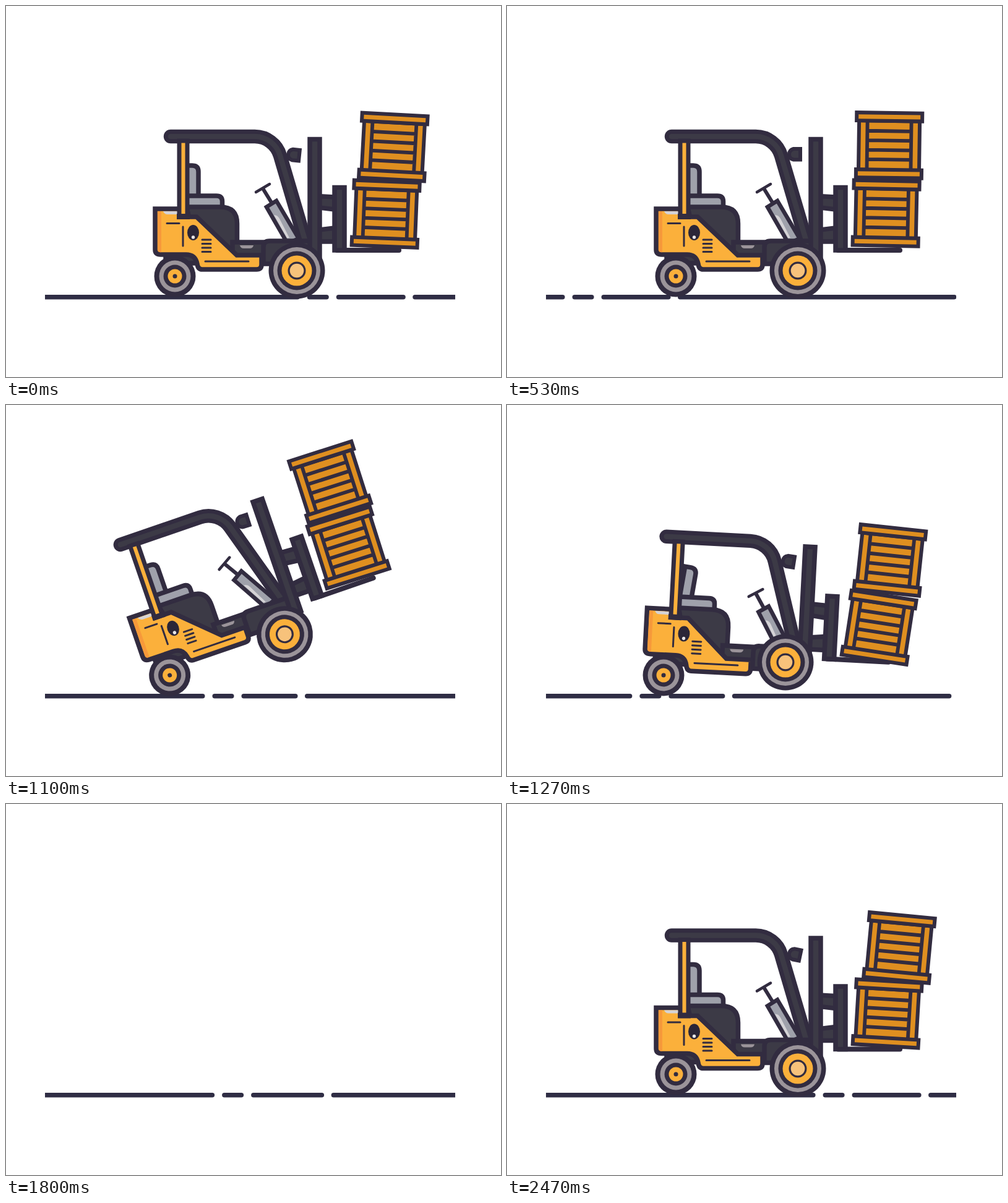
Animation, 800 px wide and 600 px high, one loop 2510 ms. Source, as an HTML page:

```html
<!DOCTYPE html>
<html lang="en">
<head>
<meta charset="utf-8">
<title>Forklift</title>
<style>
  html, body { margin: 0; width: 100%; height: 100%; overflow: hidden; background: #fff; }
  svg { display: block; width: 100%; height: 100%; }
  .ink { stroke: #322c40; stroke-width: 7.5; }
  .coal { fill: #3c3a46; }
  .gold { fill: #fbb03b; }
  .steel { fill: #9fa1ab; }
  .wood { fill: #df8f20; stroke: #322c40; stroke-width: 6; }
  .line { fill: none; stroke: #322c40; stroke-width: 3; stroke-linecap: round; }
  .trail { fill: none; stroke: #3c3a46; stroke-width: 5; }
</style>
</head>
<body>
<svg viewBox="0 0 800 600">
  <defs>
    <clipPath id="strip"><rect x="63" y="460" width="663" height="20"/></clipPath>
    <g id="crate">
      <rect class="wood" x="7" y="-95" width="98" height="80"/>
      <path d="M20.5-95V-16M91.5-95V-16M20-78.6H92M20-63.2H92M20-47.8H92M20-32.4H92" stroke="#322c40" stroke-width="5.8"/>
      <rect class="wood" x="3" y="-108" width="106" height="13"/>
      <rect class="wood" x="3" y="-16" width="106" height="13"/>
    </g>
  </defs>

  <g clip-path="url(#strip)">
    <path id="ground" fill="none" stroke="#2f2d44" stroke-width="7.5" stroke-linecap="round"/>
  </g>

  <g id="trails">
    <path class="trail" data-tail="170" d="M-60 20C20 28 80 46 132 77Q206 122 255 192"/>
    <path class="trail" data-tail="33" d="M-20 20Q90 78 175 161"/>
    <path class="trail" data-tail="110" d="M60 60Q150 102 221 181Q256 224 280 272"/>
  </g>

  <g id="truck">
    <g id="body">
      <g id="lift">
        <path class="ink coal" d="M505 307.500L531 309V329L505 326ZM505 362L531 359V381H505Z"/>
        <path d="M535 395H635" stroke="#322c40" stroke-width="8" stroke-linecap="round"/>
        <rect class="ink coal" x="531" y="293.500" width="16" height="101.500"/>
        <g id="low">
          <use href="#crate"/>
          <g id="high"><use href="#crate"/></g>
        </g>
      </g>
      <path class="ink coal" d="M258 400H310V416H258Z"/>
      <path id="seat" class="ink steel" d="M292 258H301Q311 258 311 268V312H292Z"/>
      <path class="ink steel" d="M292 307H340Q349.500 307 349.500 316V328H292Z"/>
      <path class="ink coal" d="M292 325H346Q373.500 325 373.500 352V410H310Z"/>
      <rect class="ink coal" x="366" y="382" width="60" height="22"/>
      <path d="M378 387H400Q399 392 394 392H384Q379 392 378 387Z" fill="#9b949a"/>
      <path class="ink" fill="none" d="M431 321L415 295" style="stroke-width:6"/>
      <path class="line" d="M404 301L426 288" style="stroke-width:4.500"/>
      <path class="ink steel" d="M421 325L437 315L473 376L455 384Z" style="stroke-width:6.500"/>
      <path d="M433 338Q439 338 442 344L458 375H454Z" fill="#d5d3d6"/>
      <g id="lamp"><path class="ink coal" d="M474 231H463Q456 233 456 240Q456 247 463 248.500H474Z" style="stroke-width:6"/></g>
      <path d="M266 211H402A42.800 42.800 0 0 1 443 242L483 378" fill="none" stroke="#322c40" stroke-width="22.500" stroke-linecap="round"/>
      <path d="M266 211H402A42.800 42.800 0 0 1 443 242L483 378" fill="none" stroke="#3c3a46" stroke-width="8.500" stroke-linecap="round"/>
      <path class="ink coal" d="M416 417V390Q416 380 426 380H492V417Z"/>
      <rect class="ink coal" x="491" y="215.500" width="16" height="192"/>
      <path class="ink gold" d="M241 328H280V341H308L373 403H413V418Q413 426 405 426H317Q310 426 309 417Q306 402 291 402H250Q241 402 241 394Z"/>
      <path d="M245 332H251V398Q245 399 245 393Z" fill="#f7993a"/>
      <path d="M254 332H277V337H261Q256 337 254 332Z" fill="#d5d3d6"/>
      <rect class="ink gold" x="280" y="218" width="13" height="123" style="stroke-width:7"/>
      <path d="M276 336H297V345H276Z" fill="#322c40"/>
      <path class="line" d="M260 351.500H280M286 357V388M317 378H331M317 384.500H331M317 391H331M317 397.500H331M322 413H392"/>
      <ellipse cx="302.500" cy="366.500" rx="9.500" ry="12.500" fill="#2b2638"/>
      <circle cx="302.500" cy="374" r="2.700" fill="#e8e6e8"/>
    </g>
    <g id="rear">
      <circle r="33.500" fill="#322c40"/><circle r="25.500" fill="#9b949a"/>
      <circle r="18.500" fill="#322c40"/><circle r="11.500" fill="#fbb03b"/><circle r="3.500" fill="#322c40"/>
    </g>
    <g id="front">
      <circle r="45.500" fill="#322c40"/><circle r="38" fill="#9b949a"/>
      <circle r="31.500" fill="#322c40"/><circle r="24.500" fill="#fbb03b"/>
      <circle r="14.500" fill="#322c40"/><circle r="11.300" fill="#f7c27b"/>
    </g>
  </g>
  <path id="dust" class="line" style="stroke-width:8"/>
</svg>

<script>
  const LOOP = 2510, FRAMES = 75, STEP = 1000 / 30, SPAN = 1787;
  const $ = id => document.getElementById(id);
  const move = (id, x, y, turn = 0, cx = 0, cy = 0) =>
    $(id).setAttribute('transform', `translate(${x} ${y}) rotate(${turn} ${cx} ${cy})`);

  // Eased value between [frame, value] stops
  function ease(f, stops) {
    const n = stops.findIndex(s => s[0] >= f);
    if (n === 0) return stops[0][1];
    if (n < 0) return stops[stops.length - 1][1];
    const [a, from] = stops[n - 1], [b, to] = stops[n];
    const u = (f - a) / (b - a);
    return from + (to - from) * u * u * (3 - 2 * u);
  }

  const sway = [[0, .5], [2, .1], [5, .8], [9, .1], [12, .7], [16, 0], [20, .7], [24, .1], [28, .4],
    [33, .1], [38, .5], [62, .5], [66, .1], [70, .5], [74, 1]];
  const bob = [[0, 0], [3, -2], [7, 2], [11, -2], [16, 0], [20, 2], [24, -2], [28, 2.5], [33, -3],
    [38, 6.9], [42, 0], [61, -4], [62, -2.4], [65, 4], [69, -1], [74, 1.5]];
  const tilt = [[29, 0], [33, -2], [38, 3], [42, 0], [60, 0], [62, 1.5], [66, 0]];
  const raise = [[56, 20], [62, 56], [64, 68], [72, 0]];
  const lean = [[33, 0], [38, 3.5], [42, 0]];
  const gap = [[57, 0], [62, 3], [67, 0]];
  const kick = [[34, 0], [38, -12], [41, 0]];
  const pitch = [[28, 0], [33, -17], [38, 0], [43, -8], [55, -8], [59, 5], [62, 0]];

  // Each group: start, length of its middle dash
  const breaks = [[475, 112], [1108, 91], [1624, 118]];

  function drawGround(f) {
    const shift = f * SPAN / FRAMES;
    let x = -SPAN, d = '';
    const dash = (from, to) => { d += `M${from - shift} 470.7H${to - shift}`; };
    for (let lap = -1; lap < 3; lap++) {
      for (const [start, mid] of breaks) {
        const s = start + lap * SPAN;
        dash(x, s - 4);
        dash(s + 15.5, s + 43);
        dash(s + 62.5, s + 55 + mid);
        x = s + 74 + mid;
      }
    }
    $('ground').setAttribute('d', d);
  }

  function drawTruck(f) {
    let x = ease(f, [[29, 0], [38, -20], [41, -26]]), y = 0;
    if (f > 41) x += 666 * ((f - 41) / 7) ** 2;
    if (f > 54) {
      x = Math.min(0, -650 * (61 - f) / 6);
      y = -180 * (1 - (1 + x / 650) ** 5);
    }
    move('truck', x, y, ease(f, pitch), 273, 437);
    move('body', 0, ease(f, bob), ease(f, tilt), 370, 430);
    move('rear', 273, 437);
    move('front', 470, 428 + ease(f, kick));
    move('lift', 0, f < 55 ? 0 : -ease(f, raise));

    const s = ease(f, sway), e = ease(f, lean), g = ease(f, gap);
    const low = 1.2 + 2.2 * s + e, high = .8 + 4.6 * s;
    move('low', 555.5, 389.5, low);
    move('high', 3 + 8 * s - e - 2.8 * g, -109.5 + e / 2 - g, high - low);
    move('lamp', 0, 0, 12 * s, 456, 240);
    move('seat', 0, 0, 2 * e, 298, 312);
  }

  function drawTrails(f) {
    const head = Math.min(1, Math.max(0, (f - 56) / 5));
    const tail = f <= 62 ? 1 : 1 - (f - 62) / 4;
    $('trails').style.display = f > 56 && f < 66 ? '' : 'none';
    for (const p of $('trails').children) {
      const end = p.getTotalLength() * head;
      const begin = Math.max(0, end - p.dataset.tail * tail);
      p.setAttribute('stroke-dasharray', `0 ${begin} ${end - begin} 2000`);
    }
  }

  function drawDust(f) {
    const k = f - 62;
    $('dust').style.display = Math.abs(k) < 2 ? '' : 'none';
    $('dust').setAttribute('d',
      `M${459 - 8 * k} ${453 - 4 * k}l7 6M${477 + 2 * k} ${444 - 8 * k}v7M${492 + 8 * k} ${453 - 4 * k}l-2 6`);
  }

  function tick(time) {
    const f = Math.min(FRAMES - 1, Math.floor((time % LOOP + 5) / STEP));
    drawGround(f);
    drawTruck(f);
    drawTrails(f);
    drawDust(f);
  }

  const begin = performance.now();
  (function run() {
    tick(Math.max(0, performance.now() - begin));
    requestAnimationFrame(run);
  })();
</script>
</body>
</html>
```
